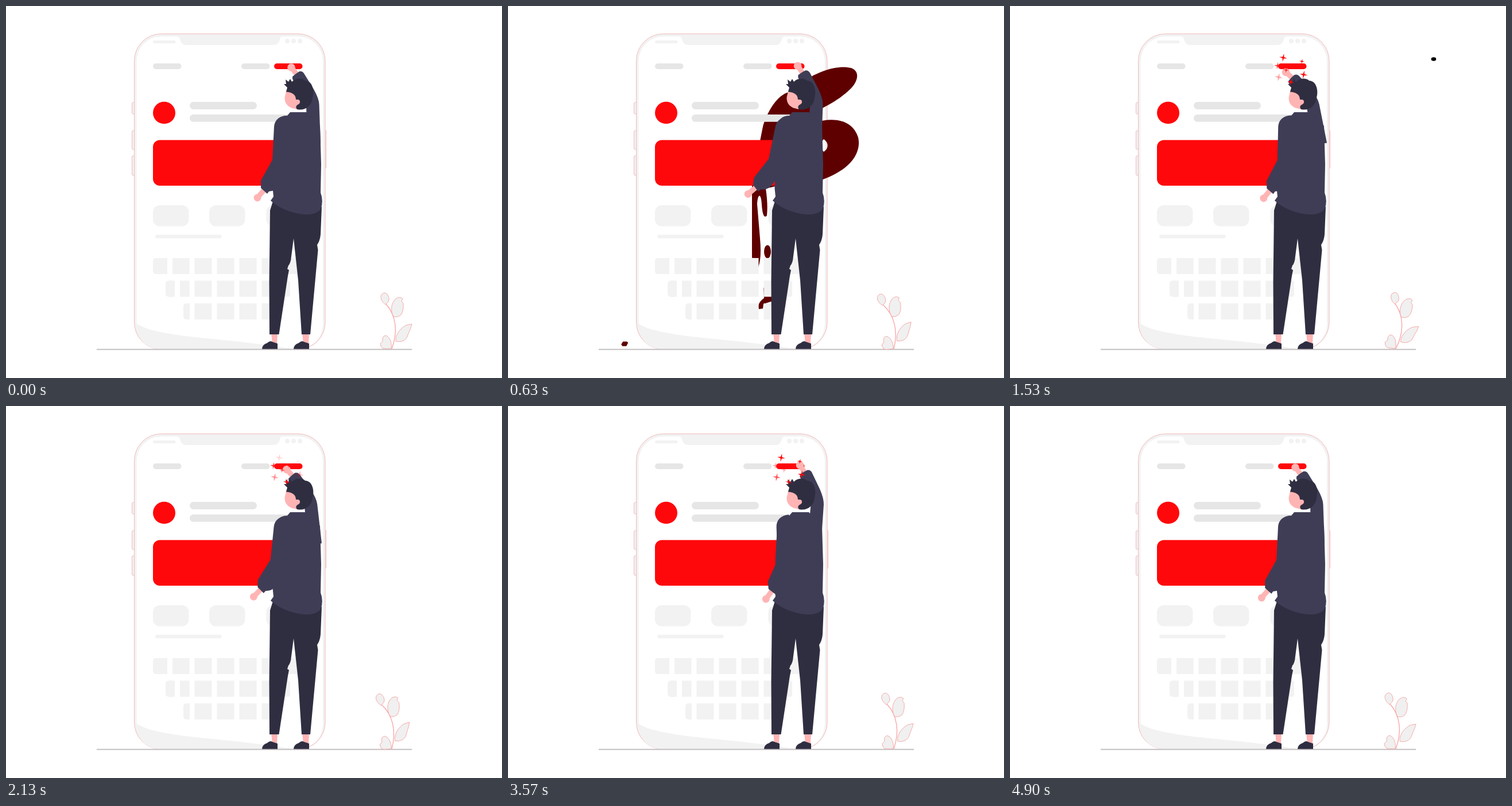
An HTML page for the animation above (4930 ms loop, 864 px wide and 648 px high).

```html
<!DOCTYPE html>
<html lang="en">
<head>
<meta charset="utf-8">
<title>App screen</title>
<style>
  html, body { margin: 0; width: 100%; height: 100%; overflow: hidden; background: #fff; }
  svg { display: block; width: 100vw; height: 100vh; }
  .light { fill: #f2f2f2; }
  .grey { fill: #e6e6e6; }
  .red { fill: #ff080b; }
  .skin { fill: #ffb4b4; }
  .dark { fill: #2f2e41; }
  .cloth { fill: #3f3d56; }
  .rim { stroke: #f3b4b4; stroke-width: .9; }
  .leaf { fill: #f0f0f0; stroke: #f7a3a3; stroke-width: .9; }
  .wrist { stroke: #ffb4b4; stroke-width: 9; }
</style>
</head>
<body>
<svg viewBox="0 0 864 648">
  <g id="phone">
    <g class="light rim">
      <rect x="219.5" y="168" width="8" height="20" rx="2"/>
      <rect x="219.5" y="217" width="8" height="33" rx="2"/>
      <rect x="219.5" y="261" width="8" height="34" rx="2"/>
      <rect x="550" y="216" width="7.5" height="67" rx="2"/>
      <rect x="223.5" y="48.5" width="332.5" height="549.5" rx="47"/>
    </g>
    <rect x="227.5" y="53" width="324.5" height="544" rx="43" fill="#fff"/>
    <path class="light" d="M227 553C255 572 330 577 400 584Q455 590 505 598H270C244 597 227 580 227 553Z"/>
    <path class="light" d="M294 52Q303 53 303 58Q305 68 315 68H465Q475 68 477 58Q477 53 486 52Z"/>
    <rect class="light" x="256" y="60" width="39.5" height="5" rx="2.5"/>
    <g class="light"><circle cx="490" cy="61" r="4"/><circle cx="501" cy="61" r="4"/><circle cx="512" cy="61" r="4"/></g>
  </g>

  <g id="splash">
    <g id="blob">
      <path d="M500 142C535 113 575 102 598 108C613 114 610 130 598 143C580 161 560 172 530 187Z"/>
      <path fill-rule="evenodd" d="M530 204C575 190 602 203 610 229C617 260 590 292 530 308ZM550 232C544 237 544 249 550 254C559 248 559 238 550 232Z"/>
      <path d="M526 215V150H490C468 154 450 188 444 210L438 240L425 313V438L436 455Q442 440 439 405L434 345C435 326 441 325 442 346C443 362 446 371 451 365Q453 345 449 318L526 300Z"/>
      <ellipse cx="452" cy="428" rx="6" ry="11.5"/>
      <path d="M445 490L453 506H461V514L445 519L444 527L437 528C434 520 440 513 446 509Z"/>
    </g>
    <path id="speck" d="M-6 1L-3 -4L4 -4L6 -2L3 4H-4Z"/>
    <ellipse id="drop" rx="4.3" ry="3.2"/>
  </g>

  <g id="screen"></g>
  <path d="M158 598.2H707" stroke="#c5bfc0" stroke-width="2"/>

  <g id="plant">
    <path d="M672 597C683 568 680 539 661 518" fill="none" stroke="#f7a3a3" stroke-width="1.3"/>
    <path class="leaf" d="M661 520C655 516 651 508 654 503Q659 497 664 502Q669 509 666 515Z"/>
    <path class="leaf" d="M675 541C669 531 671 517 679 510Q686 505 691 510L689 514L692 518Q693 532 687 539Q681 543 675 541Z"/>
    <path class="leaf" d="M679 584C678 571 688 561 697 556L707 554L705 561L702 568L698 578Q691 587 679 584Z"/>
    <path class="leaf" d="M671 597C673 587 668 575 661 574Q655 575 656 584L652 588Q653 597 660 597Z"/>
  </g>

  <g id="raised">
    <path class="wrist" d="M498 108L508 121"/>
    <circle class="skin" cx="497" cy="107" r="6.8"/>
    <path class="cloth" d="M499 127V123L505 118L511 114Q517 113 520 119L536 145Q545 161 545.5 171L548 240H524L523 165Z"/>
  </g>

  <g id="body">
    <path class="skin" d="M462 570H473L472 588H464ZM516 570H528L527 588H518Z"/>
    <path id="shoe" class="dark" d="M446 597.5Q446 590 455 587Q460 582 464 585L473 588V597.5Z"/>
    <use href="#shoe" x="55"/>
    <path class="dark" d="M465 340L460 356L458.5 480L459 572H475.5L491 470L493 460L490 458L492 452Q496 448 497 436L501 405L509 478L515 572H530L543.5 425L542 416Q547 409 548 398L550 350Z"/>
  </g>
  <g id="lowered">
    <path class="wrist" d="M438 334L450 320"/>
    <circle class="skin" cx="438" cy="334" r="6.5"/>
    <path class="cloth" d="M467 210C468 198 477 191 490 191L500 215L482 300Q476 319 464 322L458 323L455 327L444 317V304L464 268Z"/>
  </g>
  <path class="cloth" d="M495 185H524L547 209L549 276L548 325Q553 338 549 352Q542 364 520 363Q485 360 461 339L466 332L464.5 318L466 262L469 210C470 198 478 191 490 191Z"/>
  <circle class="skin" cx="503" cy="161" r="17.5"/>
  <path class="skin" d="M486 160L488 147L506 150V180Q488 174 486 160Z"/>
  <path class="dark" d="M488 149.5L490 142L484 136L488 136L487 128L492 132L495 127L498 132C504 125 517 125 521 130C533 130 538 146 534 160C533 174 521 183 507 180C504 176 505 173 510 171L508 163H505C505 155 499 150 488 149.5Z"/>
  <circle class="skin" cx="508" cy="167" r="4"/>
  <g id="sparkles" class="red"></g>
</svg>
<script>
const LOOP = 4930;
const NS = 'http://www.w3.org/2000/svg';
const $ = id => document.getElementById(id);

function add(parent, tag, attrs) {
  const el = document.createElementNS(NS, tag);
  for (const name in attrs) el.setAttribute(name, attrs[name]);
  return parent.appendChild(el);
}
const box = (cls, x, y, width, height, rx = 0) =>
  add($('screen'), 'rect', { class: cls, x, y, width, height, rx });

function buildScreen() {
  for (const [cls, x] of [['grey', 256], ['grey', 410], ['red', 467]]) box(cls, x, 100, 49.5, 10, 5);
  box('red', 256, 166.8, 39, 38.5, 19.3);
  box('grey', 320, 167, 117, 13, 6.5);
  box('grey', 320, 189, 180, 12.8, 6.4);
  box('red', 256, 233.5, 264, 79.5, 12);
  for (const x of [256, 354, 453.5]) box('light', x, 347, 62.5, 36.8, 12);
  box('light', 260, 398.5, 115.5, 6, 3);

  const keyRow = (y, left, edge, fullKeys) => {
    box('light', left, y, edge - left, 28, 5);
    box('light', left + 6, y, edge - left - 6, 28);
    for (let i = 0; i < fullKeys; i++) box('light', 328.5 + 39 * i, y, 30, 28);
  };
  keyRow(439, 256, 281, 5);
  box('light', 290, 439, 29.5, 28);
  box('light', 478, 439, 30, 28);
  keyRow(478.5, 278, 294, 4);
  box('light', 303, 478.5, 16.5, 28);
  box('light', 484, 478.5, 11, 28, 4);
  keyRow(518, 309, 320, 4);
}

// x, y, radius, lowest opacity, highest opacity, period, time of a peak
const sparkles = [
  [476, 90, 7, .12, 1, 1020, 1540],
  [508.5, 96.5, 4.5, .03, 1, 1020, 1540],
  [511.5, 119.5, 7, .3, 1, 1020, 1540],
  [468, 124, 7, .4, .7, 4200, 3600],
  [466, 104, 6, .4, .9, 3400, 1900],
  [481, 111.5, 5, .35, .85, 3600, 1700],
  [489, 132.5, 6, .85, 1, 3400, 1800],
  [493, 104, 5, .3, .9, 1500, 1600]
].map(([x, y, r, low, high, period, peak]) => {
  const q = r * .18;
  const el = add($('sparkles'), 'path', {
    d: `M0 ${-r}L${q} ${-q}L${r} 0L${q} ${q}L0 ${r}L${-q} ${q}L${-r} 0L${-q} ${-q}Z`,
    transform: `translate(${x} ${y}) rotate(10)`
  });
  return { el, low, high, period, peak };
});

// Eases between [time, value] pairs along half cosines.
function track(t, keys) {
  if (t <= keys[0][0]) return keys[0][1];
  for (let i = 1; i < keys.length; i++) {
    const [t0, a] = keys[i - 1], [t1, b] = keys[i];
    if (t <= t1) return a + (b - a) * (1 - Math.cos(Math.PI * (t - t0) / (t1 - t0))) / 2;
  }
  return keys[keys.length - 1][1];
}

// Swings from rest between two extremes, then settles back.
function swing(t, first, half, count, low, high, ending) {
  const keys = [[0, 0]];
  for (let i = 0; i < count; i++) keys.push([first + half * i, i % 2 ? high : low]);
  return track(t, [...keys, ...ending, [LOOP, 0]]);
}

const degrees = (offset, radius) => offset / radius * 180 / Math.PI;
const turn = (id, angle, x, y) => $(id).setAttribute('transform', `rotate(${angle} ${x} ${y})`);
const show = (id, on) => $(id).setAttribute('visibility', on ? 'visible' : 'hidden');

function drawSplash(t) {
  const level = Math.round(255 * Math.max(0, 1 - t / 1005));
  $('splash').setAttribute('fill', `rgb(${level},0,0)`);

  const size = track(t, [[30, 0], [480, 1], [720, 1], [1090, 0]]);
  $('blob').setAttribute('transform', `translate(510 230) scale(${size}) translate(-510 -230)`);
  show('blob', size > .01);

  $('speck').setAttribute('transform', `translate(${203 + .25 * (t - 630)} 588.5)`);
  show('speck', t > 100 && t < 1000);

  const p = Math.min(1, Math.max(0, (t - 950) / 560));
  $('drop').setAttribute('transform', `translate(${700 + 38 * p} ${56 + 36.5 * p})`);
  show('drop', t > 950 && t < 1650);
}

function render(t) {
  const lowered = swing(t, 626, 628.5, 7, -20, 20, [[4750, 5]]);
  const raised = track(t, [[0, 0], [420, 9.5], [1620, -17.5], [3150, 19], [4300, -7], [LOOP, 0]]);
  const plant = swing(t, 610, 825, 5, -10, 11.5, [[4690, 4]]);
  turn('lowered', degrees(-lowered, 129), 470, 203);
  turn('raised', degrees(raised, 107), 540, 214);
  turn('plant', degrees(plant, 92), 672, 597);
  drawSplash(t);

  const visible = track(t, [[1100, 0], [1450, 1], [4400, 1], [4790, 0]]);
  for (const s of sparkles) {
    const wave = (1 + Math.cos(2 * Math.PI * (t - s.peak) / s.period)) / 2;
    s.el.setAttribute('opacity', visible * (s.low + (s.high - s.low) * wave));
  }
}

buildScreen();
const start = performance.now();
function tick() {
  render((performance.now() - start) % LOOP);
  requestAnimationFrame(tick);
}
tick();
</script>
</body>
</html>
```
